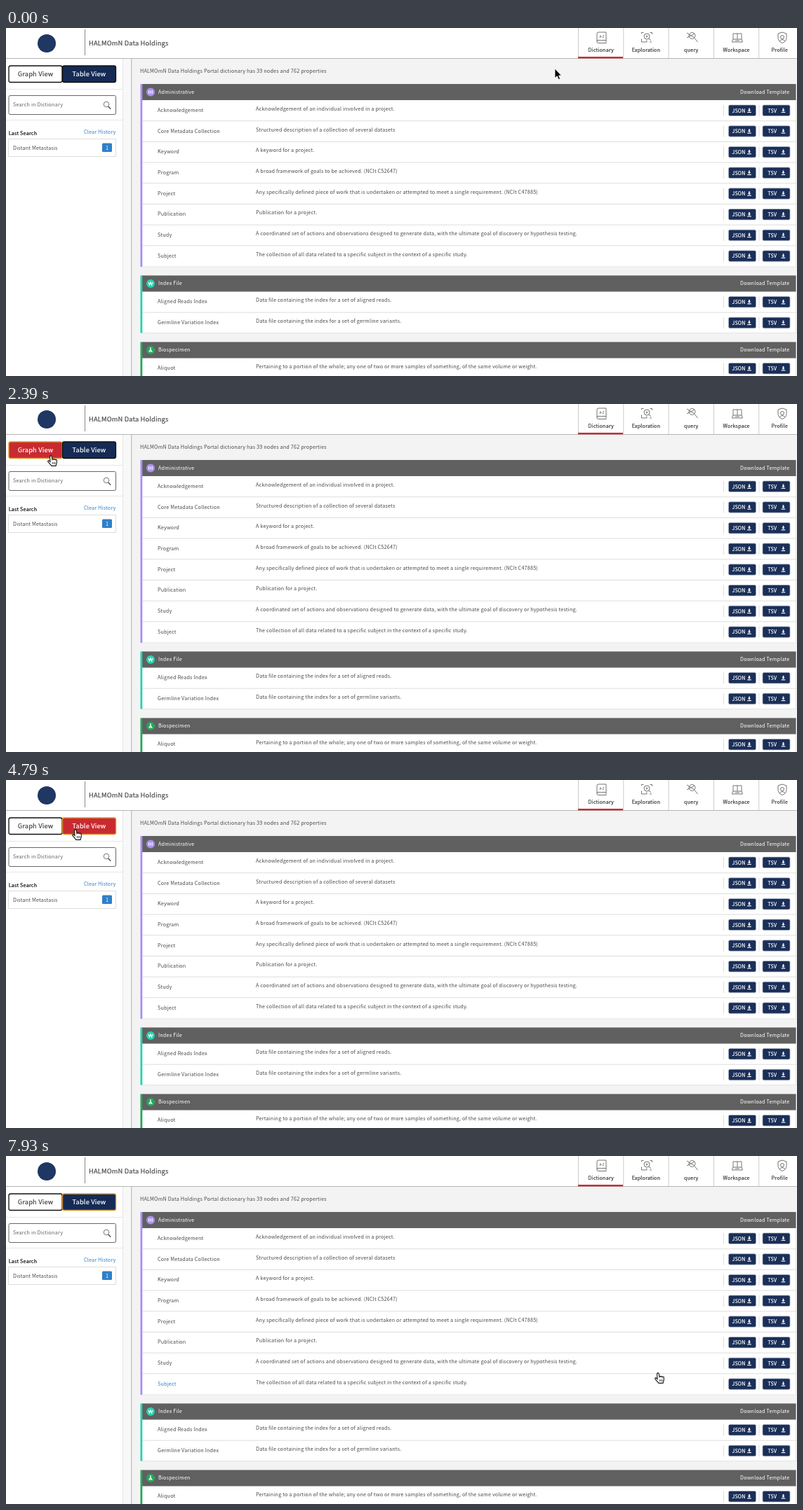
Recreate the animation shown at these times as an HTML page. Size 1127x497 px, loop 8000 ms.

```html
<!DOCTYPE html>
<html lang="en">
<head>
<meta charset="utf-8">
<title>Data dictionary</title>
<style>
html, body { margin: 0; height: 100%; overflow: hidden; background: #fff; }
svg { display: block; width: 100vw; height: 100vh; }
text {
  font-family: "Noto Sans CJK JP", "Noto Sans CJK SC", "Noto Sans", sans-serif;
  letter-spacing: .184px; white-space: pre;
}
.mid { text-anchor: middle; }
.semi { stroke: currentColor; stroke-width: .2px; }
.tiny { letter-spacing: .05px; }
.line { fill: none; stroke: #555; stroke-width: .8; }
#tint { mix-blend-mode: multiply; }
</style>
</head>
<body>
<svg id="stage" viewBox="0 0 1127 497" preserveAspectRatio="none"></svg>
<script>
const NAVY = '#152b55', RED = '#c92a30', BLUE = '#2f80c8', GREY = '#4a4a4a', ORANGE = '#f2ac74', PALE = '#f8f8f8';
const BRAND = 'HALMOmN Data Holdings';

// Text is placed by the middle of its capitals.
const text = (x, y, s, fill = GREY, cls = '', size = 7.21) =>
  `<text x="${x}" y="${y + size * .37}" font-size="${size}" fill="${fill}" color="${fill}" class="${cls}">${s}</text>`;
const rect = (x, y, w, h, fill, more = '') =>
  `<rect x="${x}" y="${y}" width="${w}" height="${h}" fill="${fill}" ${more}/>`;
const path = (d, stroke, width = 1, fill = 'none') =>
  `<path d="${d}" stroke="${stroke}" stroke-width="${width}" fill="${fill}"/>`;

const kinds = {
  a: ['Administrative', '#a990f3', 'M-2.4-2.2v4.4M0-2.2v4.4M2.4-2.2v4.4'],
  i: ['Index File', '#26d3ad', 'M-3-2l1.5 4 1.5-4 1.5 4 1.5-4'],
  b: ['Biospecimen', '#27a75b', 'M-1-3h2M0-2.8v2L-2 2h4L0-.8'],
  c: ['Clinical', '#08b3ea', 'M-3 0h6M0-3v6'],
  d: ['Data File', '#7fc308', 'M-1.6-2.5h2l1.4 1.5v3.5h-3.4z'],
  n: ['Notation', '#f0443c', 'M-3-2.5L-1 0l-2 2.5M3-2.5L1 0l2 2.5M-4 0h8']
};
const icon = (kind, x, y, r) => {
  const [, color, glyph] = kinds[kind];
  return `<g transform="translate(${x} ${y}) scale(${r / 6})"><circle r="6" fill="${color}"/>${path(glyph, '#fff', 1.1)}</g>`;
};

function header() {
  let s = rect(0, 0, 1127, 44, '#fff') + path('M0 43.5H1127', '#b5b5b5') + path('M112.5 2V39', '#8a8a8a');
  s += '<circle cx="58" cy="22" r="13" fill="#1f3763"/>' + text(118, 22, BRAND, GREY, 'semi', 9.27);
  ['Dictionary', 'Exploration', 'query', 'Workspace', 'Profile'].forEach((name, i) => {
    const x = 815.5 + 64.3 * i;
    s += path(`M${x} 0V43`, '#ccc') + text(x + (i == 4 ? 29.5 : 32.2), 31, name, '#3c3c3c', 'mid semi');
  });
  s += rect(815, 41, 64, 2.4, RED) + text(849, 12, 'A-Z', '#444', 'mid tiny', 4.5);
  const icons = 'M855 6H844q-2 0-2 2V19.500q0 2 2 2H855zM842 19q0-1.500 2-1.500H855' +
    'M909 12a4 4 0 1 1 8 0a4 4 0 1 1-8 0M911.500 12h3M913 10.500v3M916 15l3 3M905.500 8v-1.500h3M917.500 6.500h3V9' +
    'M905.500 15.500V20H913v-2.500M917 20h3M973 11a4.500 4.500 0 1 1 9 0a4.500 4.500 0 1 1-9 0M981 14.500l4.500 5.500M970 7l11 7M981 8l-11 6' +
    'M1036 8h12v8h-12zM1036 16l-1.500 4h15l-1.500-4M1039 18h6M1042 8v8' +
    'M1106 6l6 2v6q0 5-6 7.500q-6-2.500-6-7.500V8zM1103.500 13a2.500 2.500 0 1 1 5 0a2.500 2.500 0 1 1-5 0M1102 19q4-5 8 0';
  return s + `<path class="line" d="${icons}"/>`;
}

function sidebar() {
  let s = rect(0, 44, 166, 453, '#fff') + rect(166, 44, 12, 453, PALE) +
    path('M166.5 44V497M0 87.500H166M0 131.500H166', '#e6e6e6') + path('M178.8 44V497', '#b8b8b8', 1.2);
  s += rect(4, 96.5, 152.5, 27, '#fff', 'rx="2" stroke="#666"') +
    text(10, 109.5, 'Search in Dictionary', '#666') +
    '<circle class="line" cx="143" cy="109" r="3.8"/>' + path('M145.7 112l3.500 3.800', '#444', 1.3);
  s += text(3.7, 150, 'Last Search', '#111', 'semi') + text(111, 148.5, 'Clear History', BLUE) +
    rect(3.5, 158.5, 153, 25, '#fff', 'stroke="#ddd"') + text(10, 171, 'Distant Metastasis') +
    rect(137, 164.5, 14, 12.5, BLUE, 'rx="1.500"') + text(144, 171, '1', '#fff', 'mid');
  ['Graph View', 'Table View'].forEach((name, i) => {
    s += `<g id="tab${i}">` + rect(4 + 76.5 * i, 54, 76, 23.5, '#fff', 'rx="2.500" stroke-width="1.300"') +
      text(42 + 76.5 * i, 66, name, 'currentColor', 'mid semi', 9.27) + '</g>';
  });
  return s;
}

const rows = [];
function card(top, kind, items, h) {
  const [name, color] = kinds[kind];
  let s = rect(192, top, 933.5, h, '#fff', 'stroke="#ddd" stroke-width=".7"') +
    rect(194, top, 931.5, 23, '#606060') + rect(191.5, top, 2.8, h, color) +
    icon(kind, 206, top + 11.5, 6) + text(217, top + 11, name, '#fff') + text(1046, top + 11, 'Download Template', '#fff');
  items.forEach(([label, info], i) => {
    const y = top + 38 + 29.7 * i;
    if (i) s += path(`M194 ${y - 15}H1125`, '#ddd');
    s += `<g id="row${rows.length}">${text(216, y - .8, label, 'currentColor')}</g>` + text(356, y - 2.7, info) +
      path(`M1022.500 ${y - 8}v16M1073 ${y - 8}v16`, '#ddd');
    [['JSON', 1029.5], ['TSV', 1078]].forEach(([type, x]) => {
      s += rect(x, y - 8, 39, 15.5, '#1a2f58', 'rx="2" stroke="#aab2c2" stroke-width=".7"') +
        text(x + (type == 'TSV' ? 7.5 : 5), y, type, '#fff', 'semi', 7) +
        path(`M${x + 29.5} ${y - 3.5}v3`, '#fff', 1.6) +
        path(`M${x + 27.3} ${y - 1}h4.400l-2.200 2.400z`, 'none', 0, '#fff') + path(`M${x + 26.7} ${y + 2.4}h5.600`, '#fff', 1.2);
    });
    rows.push(y);
  });
  return s;
}

function tableView() {
  return rect(179.5, 44, 948, 453, '#f3f3f3') +
    text(191, 61.5, BRAND + ' Portal dictionary has 39 nodes and 762 properties') +
    card(80, 'a', [
      ['Acknowledgement', 'Acknowledgement of an individual involved in a project.'],
      ['Core Metadata Collection', 'Structured description of a collection of several datasets'],
      ['Keyword', 'A keyword for a project.'],
      ['Program', 'A broad framework of goals to be achieved. (NCIt C52647)'],
      ['Project', 'Any specifically defined piece of work that is undertaken or attempted to meet a single requirement. (NCIt C47885)'],
      ['Publication', 'Publication for a project.'],
      ['Study', 'A coordinated set of actions and observations designed to generate data, with the ultimate goal of discovery or hypothesis testing.'],
      ['Subject', 'The collection of all data related to a specific subject in the context of a specific study.']
    ], 261) +
    card(353.5, 'i', [
      ['Aligned Reads Index', 'Data file containing the index for a set of aligned reads.'],
      ['Germline Variation Index', 'Data file containing the index for a set of germline variants.']
    ], 82) +
    card(448.5, 'b', [
      ['Aliquot', 'Pertaining to a portion of the whole; any one of two or more samples of something, of the same volume or weight.']
    ], 60);
}

// Each entry: kind, centre x, label lines; levels are 46.7 px apart.
const levels = [
  'a540 Program',
  'a540 Project',
  'a458 Acknowled/gement,a522 Keyword,a557 Publication,a655 Study',
  'a696 Subject',
  'c614.5 Family/History,c661 Medical/History,c696 Follow up,c755.5 Demographic,c790 Exposure',
  'b665 Sample,c704.5 Diagnosis',
  'b667.5 Aliquot,c702 Treatment,c736.5 Clinical/Test',
  'b505 Slide,a617 Core/Metadata/Collection,b821 Read Group',
  'n424.5 Slide/Count,d459 Reference/File,d493 Slide/Image,d528 Submitted/Methylation,d562 mRNA/Microarray,' +
  'd647 miRNA/Microarray,d681.5 Submitted/SNP Array,d715.5 Submitted/Genotyping/Array,d750 Submitted/Aligned/Reads,' +
  'd797.5 Submitted/Somatic/Mutation,d844.5 Submitted/Unaligned/Reads,d891.5 Submitted/Copy/Number',
  'd609.5 mRNA/Expression,i680 Aligned/Reads/Index,d750 Simple/Germline/Variation,n844.5 Read Group/QC'
];
const nodes = levels.flatMap((level, i) => level.split(',').map(s => {
  const [, kind, x, label] = s.match(/^(.)([\d.]+) (.*)/);
  const lines = label.split('/');
  return { kind, x: +x, y: 48.7 + 46.7 * i, lines, h: 15.2 + 3.8 * lines.length };
}));
const required = '0:1 1:2,3,4,5,18 5:6 6:7,8,9,10,11 12:14,17 13:15 14:19 17:20';
const optional = '9:12,13 13:16 17:22 14:23,24,25,26,27,28 18:21,22,23,24,25,26,27,28,29,30,31,32,33 19:28,29,30,31 28:32,34 30:34,35';

function edges(spec, color) {
  const d = spec.split(' ').map(s => {
    const [from, to] = s.split(':');
    return to.split(',').map(k => {
      const a = nodes[from], b = nodes[k], dx = b.x - a.x, y2 = b.y - 3;
      let x1 = a.x, y1 = a.y + a.h, bend = .57;
      // The wide node sends its far links out sideways.
      if (from == 18 && k < 32 && Math.abs(dx) > 40) { x1 += Math.sign(dx) * 14; y1 = a.y + 11; bend = .7; }
      const straight = Math.abs(dx) < 30 || k == 17 || k == 18;
      return `M${x1} ${y1}Q${x1 + (b.x - x1) * (straight ? .5 : bend)} ${y1 + (y2 - y1) * (straight ? .5 : .45)} ${b.x} ${y2}`;
    }).join('');
  }).join('');
  return path(d, color, .55);
}

function graphView() {
  let s = rect(179.5, 44, 948, 453, PALE) + edges(required, ORANGE) + edges(optional, '#444');
  s += path('M684 204C630 222 634 258 655 269Q664 274 665 279M700 208C718 235 716 255 705 279M702 208C735 245 735 285 736.500 326' +
    'M827 395C855 410 880 445 846 466', ORANGE, .55);
  s += path('M528 114C500 144 482 160 482 200V332C482 370 464 375 459 419' +
    'M680 348C720 366 790 355 830 365Q880 380 891 419M678 348C725 380 800 430 751 466' +
    'M607 403C580 440 570 495 625 497', '#444', .55);
  for (const n of nodes) {
    s += rect(n.x - 14, n.y, 28, n.h, PALE, `rx="1" stroke="${kinds[n.kind][1]}" stroke-width=".9"`) + icon(n.kind, n.x, n.y, 3.4);
    n.lines.forEach((line, i) => s += text(n.x, n.y + 9 + 4 * i, line, GREY, 'mid tiny', 3.1));
  }
  for (const y of [53, 76, 99]) s += rect(188, y, 17.5, 17.5, BLUE);
  s += path('M192 62v4.500h4.500M197.500 57h4.500v4.500M191.500 85h10.500M196.800 79.500v10.500M191.500 107.700h10.500', '#fff', 1.6);
  s += rect(1013, 53.5, 120, 170, '#f5f5f5', 'stroke="#e4e4e4"') + path('M1114 62.500l4.500 4.500m0-4.500l-4.500 4.500', '#555', .8) +
    path('M1022 68h11', '#f09a50', 1.5) + path('M1022 87.700h11', '#222', 1.5) +
    text(1041, 68, 'Required Link') + text(1041, 87.7, 'Optional Link');
  Object.keys(kinds).forEach((k, i) => {
    const y = 107.8 + 20.2 * i;
    s += icon(k, 1027.5, y, 6) + text(1041.5, y, kinds[k][0]);
  });
  return s;
}

const hand = path('M4 9.500L3.600 2.300a1.300 1.300 0 0 1 2.600-.3L7 6.300a1.200 1.200 0 0 1 2.200 0a1.200 1.200 0 0 1 2.100.4a1.100 1.100 0 0 1 2 .6' +
  'V11L12 15.400H6L1 9.700a1.100 1.100 0 0 1 1.600-1.600z', '#111', 1.1, '#fff') + path('M7.300 10v3M9.200 10v3M11 10v3', '#111', .7);
const arrow = path('M0 0V13.500L3.200 10.700 5.300 15.500 7.500 14.500 5.500 10H9.400z', '#fff', .8, '#000');

const stage = document.getElementById('stage');
stage.innerHTML = `<g id="table">${tableView()}</g><g id="graph">${graphView()}</g>` + sidebar() + header() +
  `<path id="tint" d="M10 10H1127V44H166V497H10z" fill="${PALE}"/><g id="hand">${hand}</g><g id="arrow">${arrow}</g>`;
const el = id => document.getElementById(id);
const show = (id, on) => el(id).setAttribute('display', on ? 'inline' : 'none');

// start, steps, from, to, bulge
const moves = [
  [150, 8, 782, 58, 96, 74, 0, 50],
  [1790, 3, 96, 74, 64, 76, 0, 0],
  [3890, 3, 64, 76, 99, 73, 0, 0],
  [5990, 7, 99, 73, 406, 323, 0, 0],
  [7040, 7, 406, 323, 929, 312, 345, 15]
];
// Fill of the two tabs: white, navy or red
const tabs = [[0, 'wn'], [1041, 'wr'], [1940, 'rn'], [2690, 'rw'], [3890, 'nr'], [4790, 'wr'], [5990, 'wn']];
const fills = { w: '#fff', n: NAVY, r: RED };

function pointer(t) {
  const [start, n, x0, y0, x1, y1, bx, by] = moves.findLast(m => t >= m[0]) || moves[0];
  const k = t < start ? 0 : Math.min(n, Math.floor((t - start) / 148.5) + 1);
  const p = 1 - (1 - k / n) ** 2, bulge = 4 * p * (1 - p);
  return [x0 + (x1 - x0) * p + bx * bulge, y0 + (y1 - y0) * p + by * bulge];
}

function draw() {
  const t = performance.now() % 8000;
  const inGraph = t >= 2690 && t < 4790;
  show('graph', inGraph);
  show('tint', inGraph);
  show('table', !inGraph);

  const state = tabs.findLast(s => t >= s[0])[1];
  const focus = t < 2390 ? -1 : t < 4490 ? 0 : 1;
  for (const i of [0, 1]) {
    const tab = el('tab' + i), box = tab.firstChild;
    box.setAttribute('fill', fills[state[i]]);
    box.setAttribute('stroke', i == focus ? '#dd962c' : '#111');
    tab.style.color = state[i] == 'w' ? '#444' : '#fff';
  }

  const [x, y] = pointer(t);
  const over = x > 194 ? rows.findIndex(r => Math.abs(r - y) < 14.8) : -1;
  rows.forEach((r, i) => el('row' + i).style.color = i == over ? BLUE : GREY);
  const onTab = x < 157 && y > 54 && y < 78;
  show('hand', onTab || over >= 0);
  show('arrow', !onTab && over < 0);
  el('hand').setAttribute('transform', `translate(${x - 5} ${y - 3})`);
  el('arrow').setAttribute('transform', `translate(${x} ${y})`);
  requestAnimationFrame(draw);
}
draw();
</script>
</body>
</html>
```
